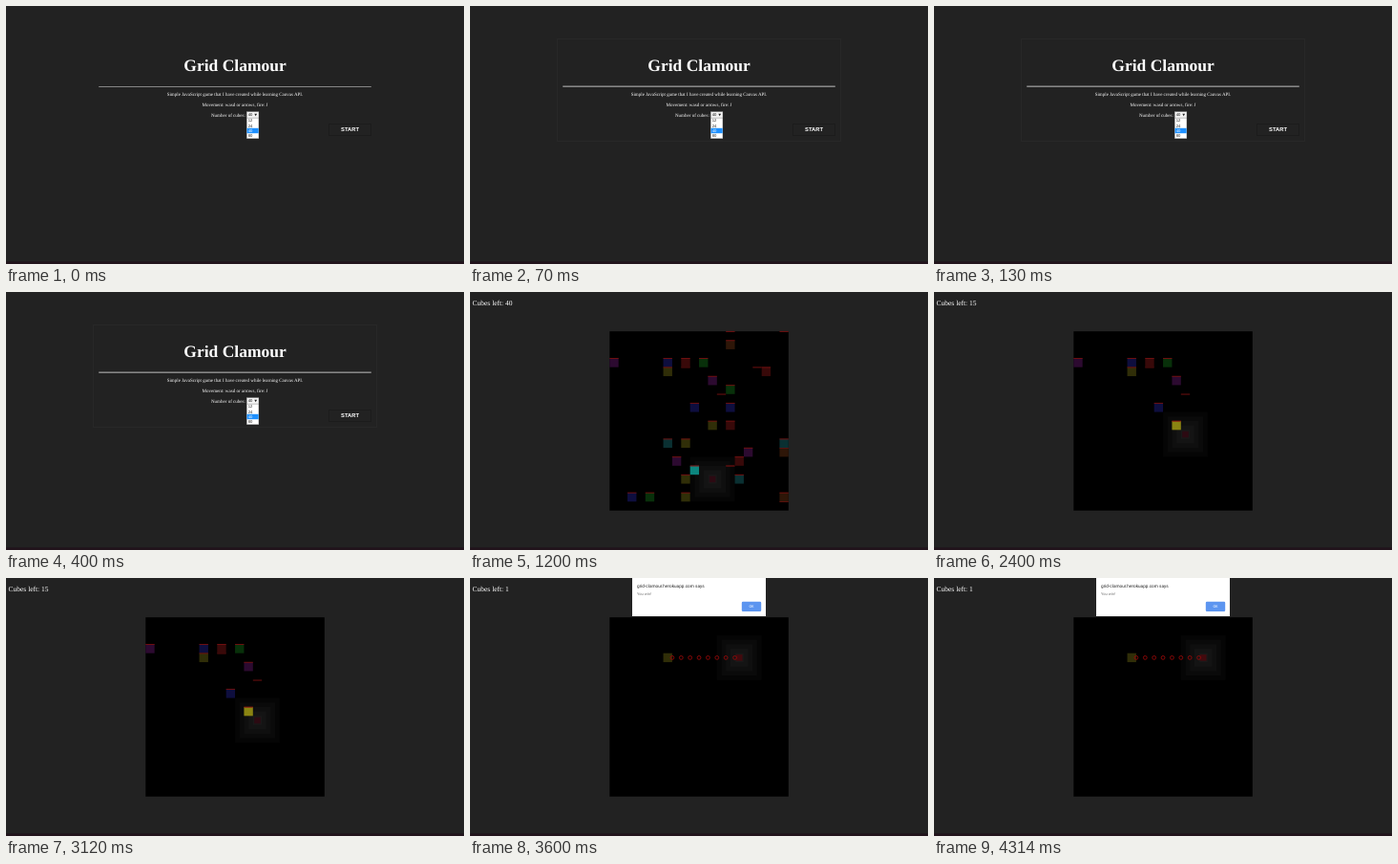
An HTML page for the animation above (4.79 s loop, 480 by 270 pixels).

```html
<!DOCTYPE html>
<html lang="en">
<head>
<meta charset="utf-8">
<title>Grid Clamour</title>
<style>
html, body { margin: 0; width: 100%; height: 100%; overflow: hidden; background: #222; }
svg { display: block; width: 100vw; height: 100vh; }
text { fill: #fff; text-rendering: geometricPrecision; }
.serif { font-family: "Liberation Serif", "Times New Roman", serif; }
.sans { font-family: "Liberation Sans", Arial, sans-serif; }
.ui { font-family: Roboto, "Open Sans", sans-serif; }
.mid { text-anchor: middle; }
</style>
</head>
<body>
<svg viewBox="0 0 480 270">
  <rect width="480" height="270" fill="#222"/>
  <rect y="267.4" width="480" height="2.6" fill="#21131b"/>

  <g id="menu" class="serif" font-size="5">
    <rect id="panel" x="91.5" y="34.5" width="297" height="107" fill="none" stroke="#282828"/>
    <text class="mid" x="240" y="67.8" font-size="17.5" font-weight="bold">Grid Clamour</text>
    <rect id="ruleTop" x="97.2" y="83" width="285.6" height="1" fill="#5c5c5c"/>
    <rect x="97.2" y="84" width="285.6" height="1" fill="#868686"/>
    <text class="mid" x="240" y="94">Simple JavaScript game that I have created while learning Canvas API.</text>
    <text class="mid" x="240" y="104.7">Movement: wasd or arrows, fire: J</text>
    <text x="215" y="115.6">Number of cubes:</text>
    <g id="list" class="sans" font-size="4.17">
      <rect x="252.3" y="110.7" width="12.6" height="6.3" fill="#f4f4f4" stroke="#999" stroke-width=".3"/>
      <text x="253.7" y="115.4" style="fill:#111">40</text>
      <path d="M260.3 112.8h2.8l-1.4 2.4z" fill="#222"/>
      <rect x="252.3" y="117.1" width="12.6" height="21.6" fill="#fff" stroke="#888" stroke-width=".3"/>
      <rect x="252.5" y="127.8" width="12.2" height="5.4" fill="#1e90ff"/>
    </g>
    <rect x="338.5" y="123.5" width="44" height="12" fill="none" stroke="#1c1c1c"/>
    <text class="sans mid" x="360.5" y="131.1" font-size="5.8" font-weight="bold">START</text>
  </g>

  <g id="game">
    <text id="score" class="serif" x="2.5" y="14.4" font-size="7.5"></text>
    <rect x="146.3" y="41.2" width="187.5" height="187.5"/>
    <g id="board"></g>
  </g>

  <g id="dialog" class="ui">
    <rect x="170" width="140" height="40" fill="#fff"/>
    <text x="175" y="9.5" font-size="4.69" style="fill:#222">grid-clamour.herokuapp.com says</text>
    <text x="175" y="18.2" font-size="4.06" style="fill:#777">You win!</text>
    <rect x="284.8" y="24.7" width="20.4" height="10.2" rx="1.2" fill="#5c95f0"/>
    <text class="mid" x="295" y="31.2" font-size="3.9">OK</text>
  </g>
</svg>
<script>
const LOOP = 4790, CELL = 9.375, LEFT = 146.3, TOP = 41.2;
const $ = id => document.getElementById(id);

// dim and lit shades of each cube colour
const SHADES = {
  black: ["#000", "#000"],
  purple: ["#2c0a30", "#80108a"],
  blue: ["#0e0e3e", "#1818a0"],
  red: ["#380909", "#a01414"],
  brown: ["#2e1608", "#8a4410"],
  green: ["#08300a", "#108a18"],
  olive: ["#302e08", "#8a8412"],
  teal: ["#0a3032", "#0c857e"]
};

// column, row pairs
const LATE = {
  black: "8,4 12,7",
  purple: "0,3 11,5",
  blue: "6,3 9,8",
  red: "8,3",
  green: "10,3",
  olive: "6,4 11,10"
};
const EARLY = {
  black: "13,0 19,0 16,4 13,15 19,19",
  purple: "15,13 7,14",
  blue: "13,8 2,18",
  red: "17,4 13,10 14,14",
  brown: "13,1 19,13 19,18",
  green: "13,6 4,18",
  olive: "8,12 8,16 8,18",
  teal: "6,12 19,12 9,15 14,16"
};

const SCENES = [
  { at: 1200, left: 40, player: [11, 16], groups: [EARLY, LATE], bars: true },
  { at: 2400, left: 15, player: [12, 11], groups: [LATE], bars: true },
  { at: 3600, left: 1, player: [14, 4], groups: [{ olive: "6,4" }], shots: 8 }
];

const rect = (x, y, w, h, fill, extra = "") =>
  `<rect x="${x}" y="${y}" width="${w}" height="${h}" fill="${fill}" ${extra}/>`;
const px = col => LEFT + col * CELL;
const py = row => TOP + row * CELL;

function glow([col, row]) {
  const cx = px(col + .5), cy = py(row + .5);
  let out = "";
  for (let i = 5; i > 0; i--) {
    const r = i * CELL / 2;
    out += rect(cx - r, cy - r, 2 * r, 2 * r, "#fff", 'fill-opacity=".019"');
  }
  return out;
}

function cubes(group, [pc, pr], bars) {
  let out = "";
  for (const name in group) {
    for (const pair of group[name].split(" ")) {
      const [c, r] = pair.split(",").map(Number);
      const lit = Math.max(Math.abs(c - pc), Math.abs(r - pr)) <= 2;
      if (name !== "black") out += rect(px(c), py(r), CELL, CELL, SHADES[name][+lit]);
      if (bars) out += rect(px(c), py(r) - .3, CELL, 1, lit ? "#8a1212" : "#701010");
    }
  }
  return out;
}

function shots(count, row) {
  let out = "";
  for (let i = 0; i < count; i++)
    out += `<circle cx="${px(7 + i)}" cy="${py(row + .5)}" r="1.9" fill="none" stroke="#960a0a" stroke-width=".9"/>`;
  return out;
}

function board({ player, groups, bars, shots: count = 0 }) {
  const [c, r] = player;
  return glow(player)
    + groups.map(g => cubes(g, player, bars)).join("")
    + rect(px(c) + 1.4, py(r) + 1.4, CELL - 2.8, CELL - 2.8, count ? "#420a0e" : "#2c0a12")
    + shots(count, r);
}

const show = (id, on) => $(id).setAttribute("visibility", on ? "visible" : "hidden");

$("list").insertAdjacentHTML("beforeend", [12, 24, 40, 80].map((n, i) =>
  `<text x="253.7" y="${121.2 + i * 5.35}" style="fill:${n === 40 ? "#fff" : "#222"}">${n}</text>`).join(""));

let current;
function draw(t) {
  const scene = SCENES.filter(s => t >= s.at).pop();
  show("menu", !scene);
  show("panel", !scene && t >= 70);
  show("ruleTop", !scene && t >= 70);
  show("game", scene);
  show("dialog", scene && scene.shots);
  if (scene && scene !== current) {
    $("score").textContent = "Cubes left: " + scene.left;
    $("board").innerHTML = board(scene);
  }
  current = scene;
}

const start = performance.now();
function tick() {
  draw((performance.now() - start) % LOOP);
  requestAnimationFrame(tick);
}
tick();
</script>
</body>
</html>
```
